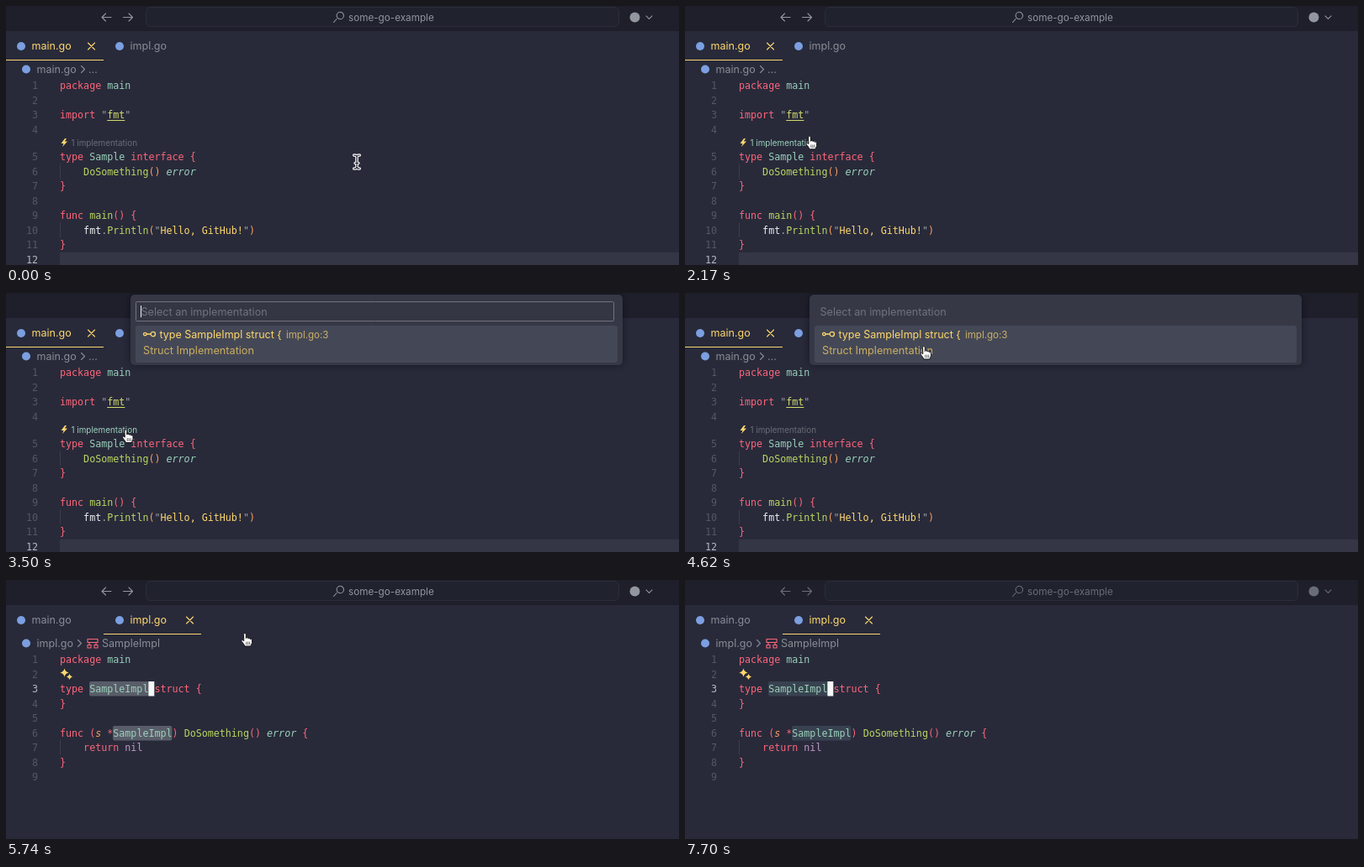
Write an HTML page with a canvas that moves like this. It is 800 px wide and 309 px high and loops after 7770 ms.

```html
<!DOCTYPE html>
<html lang="en">
<head>
<meta charset="utf-8">
<title>Jump to implementation</title>
<style>
  html, body { margin: 0; height: 100%; overflow: hidden; background: #282a3a; }
  canvas { display: block; }
</style>
</head>
<body>
<canvas id="stage" width="800" height="309"></canvas>
<script>
const ctx = document.getElementById('stage').getContext('2d');
const LOOP = 7770, STEP = 70, BLINK = 490;
const PICK_OPEN = 3290, PICK_PRESS = 4620, PICK_DONE = 4760, BLUR = 7630;
const UI = 'Inter, sans-serif', MONO = '"DejaVu Sans Mono", monospace';
const CODE_SIZE = 11.68, CHAR = 7.03;
const YELLOW = '#ffd76d', GREY = '#888d94', LOGO = '#7b9fe0';

// Each token starts with its colour key; a capital key means italic.
const COLORS = { p: '#ff657a', b: '#9cd1bb', g: '#bad761', o: '#ff9b5e', y: YELLOW,
                 w: '#eaf2f1', d: '#9a9fa6', v: '#c39ac9', l: '#d3dc6c' };
const MAIN = ['ppackage |bmain', '', 'pimport |d"|lfmt|d"', '',
  'ptype |bSample |pinterface {', 'w    |gDoSomething|o() |Berror', 'p}', '',
  'pfunc |gmain|p() {', 'w    fmt|d.|gPrintln|o(|d"|yHello, GitHub!|d"|o)', 'p}', ''];
const IMPL = ['ppackage |bmain', '', 'ptype |bSampleImpl |pstruct {', 'p}', '',
  'pfunc (|Os |p*|bSampleImpl|p) |gDoSomething|p() |Berror |p{',
  'w    |preturn |vnil', 'p}', ''];

const smooth = u => u * u * (3 - 2 * u);
const MOVES = [ // start, end, x, y, easing
  [1050, 1820, 173, 132, smooth],
  [1820, 2310, 144.5, 170.5, smooth],
  [3640, 4410, 286, 71, smooth],
  [6160, 7210, 410, 330, u => u * u]];

function pointerAt(t) {
  let x = 417, y = 186;
  for (const [start, end, toX, toY, ease] of MOVES) {
    const k = ease(Math.min(1, Math.max(0, (t - start) / (end - start))));
    x += (toX - x) * k;
    y += (toY - y) * k;
  }
  return { x, y };
}

const blinkOn = elapsed => Math.floor(elapsed / BLINK) % 2 === 0;

function rect(x, y, w, h, fill, radius = 0, border) {
  ctx.beginPath();
  ctx.roundRect(x, y, w, h, radius);
  if (fill) { ctx.fillStyle = fill; ctx.fill(); }
  if (border) { ctx.strokeStyle = border; ctx.lineWidth = 1; ctx.stroke(); }
}

function text(str, x, y, color, size = 12.5, family = UI, style = '') {
  ctx.font = `${style} ${size}px ${family}`;
  ctx.fillStyle = color;
  ctx.fillText(str, x, y);
}

function dot(x, y, r, color) {
  ctx.beginPath();
  ctx.arc(x, y, r, 0, 7);
  ctx.fillStyle = color;
  ctx.fill();
}

function shape(d, x, y, { fill, stroke, width = 1.1 }) {
  const path = new Path2D(d);
  ctx.save();
  ctx.translate(x, y);
  ctx.lineJoin = ctx.lineCap = 'round';
  if (fill) { ctx.fillStyle = fill; ctx.fill(path); }
  if (stroke) { ctx.strokeStyle = stroke; ctx.lineWidth = width; ctx.stroke(path); }
  ctx.restore();
}

function titleBar(focused) {
  const color = focused ? '#92969e' : '#696d77';
  rect(166.5, 1.5, 562, 23, '#20222e', 5, '#2b2d3a');
  shape('M5.5 0H-5.5M-1-4.5L-5.5 0L-1 4.5', 119.5, 13.5, { stroke: color });
  shape('M-5.5 0H5.5M1-4.5L5.5 0L1 4.5', 145, 13.5, { stroke: color });
  shape('M-2.5 2.5L-6 6.5M6-1.5A4.2 4.2 0 1 1-2.4-1.5A4.2 4.2 0 1 1 6-1.5', 395.5, 13, { stroke: color });
  text('some-go-example', 407, 17.5, color, 11.7);
  dot(747.5, 13.5, 6, color);
  shape('M-3.5-1.7L0 1.8L3.5-1.7', 764.5, 13.5, { stroke: color });
}

function tabs(active) {
  ['main.go', 'impl.go'].forEach((name, i) => {
    const x = i * 117, on = i === active;
    dot(18 + x, 48, 5, LOGO);
    text(name, 30.5 + x, 52.3, on ? YELLOW : GREY);
    if (!on) return;
    rect(i * 116, 64, 116, 1, YELLOW);
    shape('M-4-4L4 4M4-4L-4 4', 101.5 + x, 48, { stroke: YELLOW });
  });
}

function breadcrumb(inImpl) {
  dot(24, 75.5, 5, LOGO);
  text(inImpl ? 'impl.go' : 'main.go', 36.5, 80, GREY);
  shape('M-2-4L2 0L-2 4', inImpl ? 87.5 : 91.5, 75.5, { stroke: GREY });
  if (!inImpl) return text('…', 98, 80, GREY);
  shape('M-6-5H6V-1H-6ZM-6 2H-2V5.5H-6ZM2 2H6V5.5H2ZM-4-1V2M4-1V2', 103, 75.5, { stroke: '#ff657a' });
  text('SampleImpl', 114, 80, GREY);
}

function code(lines, current, lensAfter) {
  lines.forEach((line, i) => {
    const y = 99 + 17.5 * (i + (i >= lensAfter ? .86 : 0));
    const number = String(i + 1);
    text(number, 38 - CHAR * number.length, y, i === current ? '#b2b9bd' : '#535763', CODE_SIZE, MONO);
    if (line.includes('    ')) rect(64, y - 13, 1, 17.5, '#3b3d4c');
    let x = 64;
    for (const token of line ? line.split('|') : []) {
      const key = token[0].toLowerCase(), str = token.slice(1);
      text(str, x, y, COLORS[key], CODE_SIZE, MONO, key === token[0] ? '' : 'italic');
      if (key === 'l') rect(x, y + 2, CHAR * str.length, 1, COLORS.l);
      x += CHAR * str.length;
    }
  });
}

function mainFile(lensHover) {
  rect(64, 294, 736, 15, '#343645');
  code(MAIN, 11, 4);
  shape('M1-5L-3.5 1H-.5L-2 5L4-1.5H.8L3-5Z', 69, 163, { fill: YELLOW });
  text('1 implementation', 77.5, 166.8, lensHover ? '#9cd1bb' : '#696d77', 9.9);
}

function implFile(t) {
  const mark = t < BLUR ? '#595d69' : '#384250';
  rect(99, 121, 70.3, 17.5, mark, 2);
  rect(127, 174, 70.3, 17.5, mark, 2);
  code(IMPL, 2, 99);
  const star = 'M0-5Q.9-.9 5 0Q.9 .9 0 5Q-.9 .9-5 0Q-.9-.9 0-5Z';
  shape(star, 69.5, 110.5, { fill: YELLOW });
  shape('M0-3.5Q.6-.6 3.5 0Q.6 .6 0 3.5Q-.6 .6-3.5 0Q-.6-.6 0-3.5Z', 75.5, 115.5, { fill: YELLOW });
  if (blinkOn(t - PICK_DONE)) rect(169.3, 121, 7, 17.5, '#f4f7f6');
}

function quickPick(t) {
  const focused = t < PICK_PRESS;
  ctx.save();
  ctx.shadowColor = 'rgba(0,0,0,.45)';
  ctx.shadowBlur = 10;
  rect(148, 2, 585, 84, '#363846', 5);
  ctx.restore();
  rect(154, 39, 573, 44, '#444856', 3);
  if (focused) rect(154.5, 10.5, 568, 23, '#343644', 1, '#70747e');
  text('Select an implementation', 160.5, 27, '#70747e', 12.6);
  if (focused && blinkOn(t - PICK_OPEN)) rect(160, 15, 1, 14, '#eaf2f1');
  shape('M-3 0H2M-3 0A1.7 1.7 0 1 1-6.4 0A1.7 1.7 0 1 1-3 0M7.5 0A2.7 2.7 0 1 1 2.1 0A2.7 2.7 0 1 1 7.5 0',
    170, 49, { stroke: YELLOW, width: 1.3 });
  text('type SampleImpl struct {', 182.5, 53.7, YELLOW, 12.5);
  text('impl.go:3', 333, 53.7, '#cbb068', 11.5);
  text('Struct Implementation', 163, 72.7, '#cbae62', 12.7);
}

function pointer({ x, y }, hand) {
  if (hand) {
    shape('M-3.5-6C-3.5-8-.7-8-.7-6V-1.5C-.3-3 1.6-2.6 1.8-1.2C2.4-2.2 4-1.7 4.2-.4C5-1.2 6.5-.7 6.5.8V3.5C6.5 5 5.2 5.8 5 8H-2.2C-2.6 5.8-4.3 4.6-5.7 2.4C-6.9.8-5.3-.2-3.5 1.4Z',
      x, y, { fill: '#fff', stroke: '#111', width: 1 });
    shape('M0 3V6M2 3V6M4 3V6', x - .3, y, { stroke: '#222', width: .7 });
    return;
  }
  const beam = 'M-3.2-8Q0-8 0-6Q0-8 3.2-8M0-6V6M-3.2 8Q0 8 0 6Q0 8 3.2 8M-1.8 1.5H1.8';
  shape(beam, x, y, { stroke: '#fff', width: 3.6 });
  shape(beam, x, y, { stroke: '#20222c', width: 1.2 });
}

function draw(t) {
  const inImpl = t >= PICK_DONE, picking = t >= PICK_OPEN && !inImpl;
  const p = pointerAt(t);
  const overLens = !inImpl && p.x > 64 && p.x < 159 && p.y > 162 && p.y < 178;
  const overPick = picking && p.y < 92;
  rect(0, 0, 800, 309, '#282a3a');
  rect(0, 0, 800, 30, '#1e1f2b');
  if (!picking) titleBar(t < BLUR);
  tabs(+inImpl);
  breadcrumb(inImpl);
  if (inImpl) implFile(t);
  else mainFile(overLens);
  if (picking) quickPick(t);
  pointer(p, overLens || overPick || (inImpl && t <= 6230));
}

function tick(now) {
  draw(Math.floor(now % LOOP / STEP) * STEP);
  requestAnimationFrame(tick);
}
requestAnimationFrame(tick);
</script>
</body>
</html>
```
